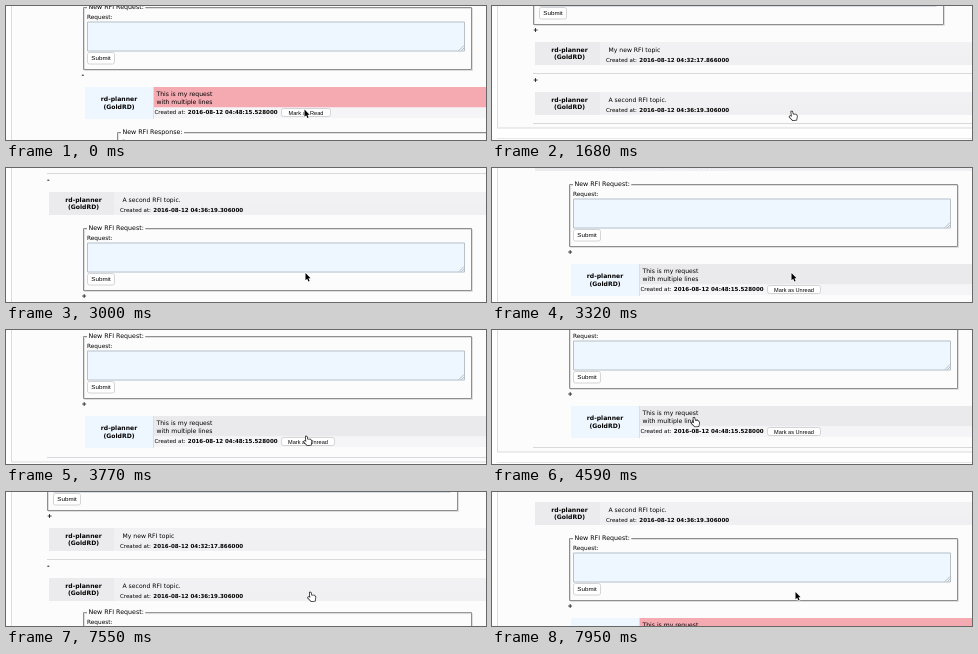
An HTML page with a canvas for the animation above (8 s loop, 480 by 134 pixels).

```html
<!DOCTYPE html>
<html lang="en">
<head>
<meta charset="utf-8">
<title>Request list</title>
<style>
html, body { margin: 0; width: 100%; height: 100%; overflow: hidden; background: #fff; }
canvas { display: block; }
</style>
</head>
<body>
<canvas id="stage" width="480" height="134"></canvas>
<script>
const ctx = document.getElementById('stage').getContext('2d');
const LOOP = 8000;
const SANS = '"DejaVu Sans", Verdana, sans-serif';
const ARIAL = '"Liberation Sans", Arial, sans-serif';
const PANEL = '#fcfcfd';

const linear = p => p;
const easeOut = p => 1 - (1 - p) * (1 - p);
const swing = p => 0.5 - Math.cos(Math.PI * p) / 2;
const hold = () => 0;

// Each row: time, values..., easing towards the next row
const SCROLL = [
  [0, 121, hold], [860, 0, hold], [2700, 0, linear], [3000, 62, easeOut],
  [3500, 113, hold], [3725, 113, linear], [3770, 116, easeOut],
  [4500, 126, hold], [6680, 0, hold], [7670, 0, linear], [7950, 76, linear],
  [8000, 82, hold]
];
const POINTER = [
  [0, 298.5, 103.5, hold], [860, 299, 105, hold], [2700, 299, 105, linear],
  [3000, 299.5, 105, hold], [3770, 299.5, 106, swing],
  [4500, 198, 87, swing], [5320, 303.5, 100, hold], [8000, 303.5, 100.5, hold]
];
// Spans in which the pointer is a hand
const HAND = [[900, 2750], [3450, 5200], [7180, 7750]];
// Spans in which the second topic is open; each ends with a reload
const OPEN = [[-1000, 860], [2230, 6680], [7320, 9000]];

function sample(rows, t) {
  let i = 0;
  while (i < rows.length - 2 && t >= rows[i + 1][0]) i++;
  const a = rows[i], b = rows[i + 1];
  const p = a[a.length - 1](Math.min(1, (t - a[0]) / (b[0] - a[0])));
  return a.slice(1, -1).map((v, k) => v + (b[k + 1] - v) * p);
}

const within = (spans, t) => spans.find(([a, b]) => t >= a && t < b);

function rect(x, y, w, h, color) {
  ctx.fillStyle = color;
  ctx.fillRect(x, y, w, h);
}

function frame(x, y, w, h, color) {
  ctx.strokeStyle = color;
  ctx.lineWidth = 1;
  ctx.strokeRect(x + 0.5, y + 0.5, w - 1, h - 1);
}

// y is the middle of the capital letters
function text(str, x, y, size = 6.1, { bold, family = SANS, align = 'left' } = {}) {
  ctx.font = `${bold ? 'bold ' : ''}${size}px ${family}`;
  ctx.textAlign = align;
  ctx.fillStyle = '#000';
  ctx.fillText(str, x, y + size * 0.36);
}

function button(label, x, y, w, h, size) {
  ctx.beginPath();
  ctx.roundRect(x + 0.5, y + 0.5, w - 1, h - 1, 2);
  ctx.fillStyle = '#fff';
  ctx.fill();
  ctx.strokeStyle = '#d4d4d6';
  ctx.lineWidth = 1;
  ctx.stroke();
  text(label, x + w / 2, y + h / 2, size, { family: ARIAL, align: 'center' });
}

function textarea(x, y, w, h) {
  rect(x, y, w, h, '#eef7ff');
  frame(x, y, w, h, '#b9c1c8');
  ctx.strokeStyle = '#8f969c';
  ctx.lineWidth = 0.6;
  ctx.beginPath();
  for (const d of [2.5, 5]) {
    ctx.moveTo(x + w - 1 - d, y + h - 1);
    ctx.lineTo(x + w - 1, y + h - 1 - d);
  }
  ctx.stroke();
}

function fieldset(x, y, w, h, legend) {
  frame(x + 1, y + 1, w, h, '#dededf');
  frame(x, y, w, h, '#8e8e90');
  if (!legend) return;
  ctx.font = `6.3px ${SANS}`;
  rect(x + 4, y - 1, ctx.measureText(legend).width + 3, 3, PANEL);
  text(legend, x + 5.5, y, 6.3);
}

function sign(open, x, y) {
  text(open ? '-' : '+', x, y, 6.3, { bold: true });
}

function author(x, y) {
  const style = { bold: true, align: 'center' };
  text('rd-planner', x, y, 6.1, style);
  text('(GoldRD)', x, y + 7.4, 6.1, style);
}

function created(stamp, x, y) {
  text('Created at:', x, y, 5.5);
  text(stamp, x + 33.3, y, 5.53, { bold: true });
}

function topic(title, stamp, y, open) {
  sign(open, 41, y - 12);
  rect(43, y, 65, 23, '#ebebed');
  rect(108, y, 372, 13, '#f1f1f3');
  rect(108, y + 13, 372, 10, '#f0f0f2');
  author(77.5, y + 7.7);
  text(title, 116.5, y + 7.7);
  created(stamp, 114, y + 18);
}

function request(unread, open) {
  sign(open, 75.5, 190);
  rect(79, 202, 69, 32, '#eef6ff');
  rect(148, 202, 332, 20.5, unread ? '#f5a9b1' : '#eae9eb');
  rect(148, 222.5, 332, 10.5, '#f5f4f6');
  rect(147, 202, 1, 32, '#dcdee2');
  author(113, 214);
  text('This is my request', 150.5, 209.3);
  text('with multiple lines', 150.5, 217);
  created('2016-08-12 04:48:15.528000', 148.5, 227.3);
  button(unread ? 'Mark as Read' : 'Mark as Unread', 275, 223, unread ? 50 : 54, 9, 5.6);
}

function details({ shown, gap, unread, replyOpen }) {
  ctx.save();
  ctx.beginPath();
  ctx.rect(0, 110, 480, 126 * shown + gap);
  ctx.clip();
  ctx.translate(0, -5 * (1 - shown));
  fieldset(77, 122, 389, 63, 'New RFI Request:');
  text('Request:', 81, 132, 5.8);
  textarea(81, 136.5, 378, 30);
  button('Submit', 81, 167, 28, 12.5, 6.2);
  request(unread, replyOpen);
  if (gap > 12) {
    fieldset(111, 247, 400, 70, 'New RFI Response:');
    text('Response:', 116, 257, 5.8);
  }
  ctx.restore();
}

function page(state) {
  const push = 126 * state.shown + state.gap;
  const end = Math.round(122 + push + state.margin);
  rect(5, -200, 475, end + 200, PANEL);
  rect(5, -200, 1, end + 200, '#dcdce0');
  rect(5, end - 0.5, 475, 1, '#dcdce0');
  rect(5, end + 10, 475, 1, '#e6e6e9');

  fieldset(41, -60, 411, 79);
  textarea(47, -30, 398, 30.5);
  button('Submit', 47, 1, 28, 12.5, 6.2);
  topic('My new RFI topic', '2016-08-12 04:32:17.866000', 36, false);
  rect(41, 67, 439, 1, '#d9d9dc');
  topic('A second RFI topic.', '2016-08-12 04:36:19.306000', 86, state.open);
  if (state.shown > 0) details(state);
  rect(41, Math.round(116.5 + push), 439, 1, '#d9d9dc');
}

function shape(points, x, y, fill, stroke, width) {
  ctx.beginPath();
  points.forEach(([px, py]) => ctx.lineTo(x + px, y + py));
  ctx.closePath();
  ctx.lineJoin = 'round';
  ctx.lineWidth = width;
  ctx.strokeStyle = stroke;
  ctx.stroke();
  ctx.fillStyle = fill;
  ctx.fill();
}

const ARROW = [[0, 0], [0, 7.2], [1.7, 5.7], [2.9, 8.4], [4.1, 7.9], [2.9, 5.3], [5.1, 5.2]];
const PALM = [[0.2, 0.6], [1.2, 0.4], [2, 3.4], [4.9, 3.6], [6, 5], [5.4, 8.8], [1.8, 9.2], [-1.6, 5.8], [-0.8, 5], [0.8, 5.8]];

function pointer(t) {
  const [x, y] = sample(POINTER, t);
  if (within(HAND, t)) shape(PALM, x, y, '#fff', '#222', 1.5);
  else shape(ARROW, x, y, '#000', '#fff', 1.4);
}

function draw(t) {
  const span = within(OPEN, t);
  const [scroll] = sample(SCROLL, t);
  // The reply area starts to slide open, then freezes until the reload
  const reply = t < 6680 ? Math.max(0, Math.min(1, (t - 5860) / 90)) : 0;
  rect(0, 0, 480, 134, '#fff');
  ctx.save();
  ctx.translate(0, -Math.round(scroll));
  page({
    open: !!span,
    shown: span ? swing(Math.min(1, (t - span[0]) / 400)) : 0,
    gap: t < 860 ? 90 : 3 * reply,
    margin: 5 * reply,
    unread: t < 860 || t >= 6680,
    replyOpen: t < 100 || reply > 0
  });
  ctx.restore();
  pointer(t);
}

const start = performance.now();
function tick() {
  draw((performance.now() - start) % LOOP);
  requestAnimationFrame(tick);
}
tick();
</script>
</body>
</html>
```
